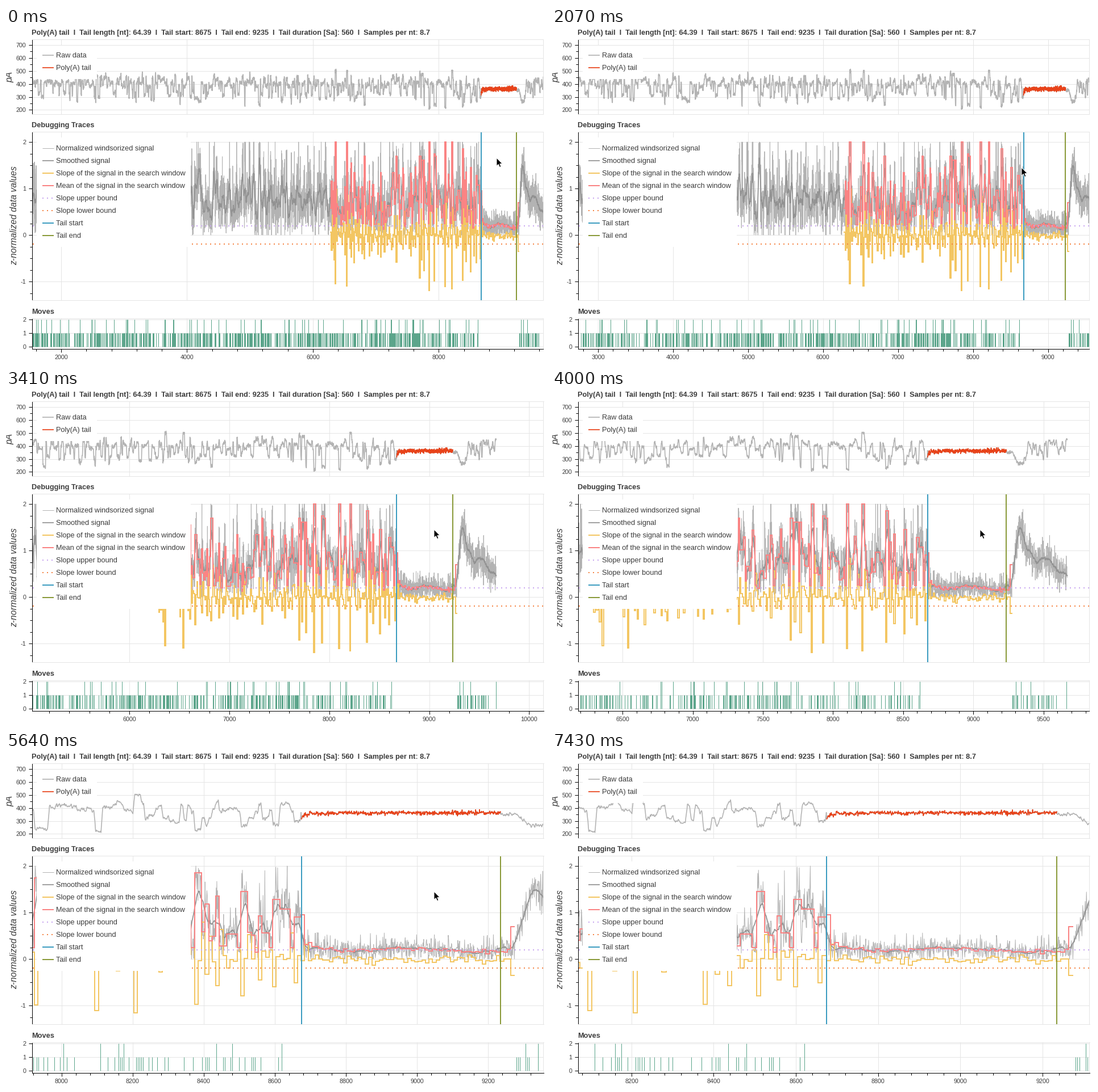
Animation, 950 px wide and 589 px high, one loop 8360 ms. Source, as a matplotlib script:

```python
import numpy as np
import matplotlib.pyplot as plt
from matplotlib.animation import FuncAnimation
from matplotlib.patches import Polygon, Rectangle
from matplotlib.ticker import FormatStrFormatter, MultipleLocator

W, H, DPI = 950, 589, 100
LEFT, RIGHT = 45.5, 945.5
FRAMES, INTERVAL = 110, 76
PX = 72 / DPI  # points per pixel

GRAY, DARK, YELLOW, PINK = "#b3b3b3", "#929292", "#f3c663", "#fa8484"
PURPLE, ORANGE, BLUE, OLIVE = "#c9a6f0", "#f58444", "#3c9cc0", "#8a9a3a"
RED, GREEN, INK, GRID = "#e8431a", "#5ca58b", "#3c3c3c", "#e5e5e5"

TAIL_START, TAIL_END = 8675, 9235
FIRST, STEP, SEARCH, SEARCH_END = 1484, 10, 6284, 9274

# ---------------------------------------------------------------- data
rng = np.random.default_rng(12)

# strongest levels: window start -> signed height
PEAKS = {6354: 2, 6534: 2, 7694: 1.7, 7844: -2, 7924: -1.75, 8094: -2,
         8204: 2, 8374: -1.85, 8504: -1.45, 8594: -1.28, 8654: -.9}


def win(x):
    return (x - FIRST) // STEP


def box(a, n):
    padded = np.pad(a, n // 2, mode="edge")
    return np.convolve(padded, np.ones(n) / n, "valid")


def sigmoid(x):
    return 1 / (1 + np.exp(-x))


def tail_level(x):
    d = np.maximum(x - TAIL_START, 0)
    return .19 + .18 * np.exp(-d / 65) + .035 * np.sin(d / 62 + 3.2)


def window_levels():
    """Signed mean level and slope of every window."""
    starts = np.arange(FIRST, SEARCH_END, STEP)
    n = len(starts)
    run = np.cumsum(rng.random(n) < .72)
    size = np.clip(rng.gamma(3.6, .2, n)[run], .12, 1.7)
    level = size * np.where(rng.random(n) < .68, 1, -1)[run]
    for x, height in PEAKS.items():
        k = win(x)
        level[k - 1] = .25
        level[k:k + 2] = height
    tail = starts > TAIL_START
    level[tail] = tail_level(starts[tail] + 5)
    level[tail] += rng.normal(0, .025, tail.sum())
    mean = np.abs(level)
    slope = .62 * (np.roll(mean, 1) - mean) + rng.normal(0, .045, n)
    mean[-1], slope[-1] = .7, -.35
    return starts, level, mean, slope


def signals(level):
    x = np.arange(1500, 9671)
    n = len(x)
    tail = (x >= TAIL_START) & (x <= TAIL_END)
    after = x > TAIL_END
    noise = rng.normal(0, 1, n)

    raw = 360 + 70 * box(level[np.minimum(win(x), len(level) - 1)], 5)
    d = x[tail] - TAIL_START
    raw[tail] = 363 - 14 * np.exp(-d / 80) - 35 * np.exp(-d / 3)
    raw[after] = 352 - 84 * sigmoid((x[after] - 9298) / 9)
    late = x > 9360
    raw[late] = box(np.repeat(rng.uniform(300, 470, 40), 9)[:late.sum()], 5)
    raw += np.where(tail, 8.5 * noise, 13 * box(noise, 3))
    raw = np.clip(raw, 200, 547)

    size = np.abs(raw - 360) / 70
    spikes = (rng.random(n) < .03) * rng.exponential(.6, n)
    z = .12 + .93 * size + spikes
    z[tail] = tail_level(x[tail]) + .3 * spikes[tail]
    u = x[after]
    z[after] = (.2 + .62 * sigmoid((u - 9290) / 8) - .3 * sigmoid((u - 9580) / 10)
                + .72 * np.exp(-((u - 9340) / 42) ** 2))
    spread = np.where(tail, .13, .1 + .15 * np.minimum(z, 1))
    z = np.clip(z + spread * rng.normal(0, 1, n), 0, 2)
    return x, raw, z, box(z, 27), tail


def moves():
    def bars(lo, hi, p):
        x = lo + np.cumsum(5 * rng.geometric(p, hi - lo))
        return x[x < hi]

    x = np.concatenate([bars(1500, 2130, .42), bars(2200, 7900, .42),
                        bars(7900, 8630, .34), bars(9270, 9600, .4), [9665]])
    h = np.where(rng.random(len(x)) < .14, 2, 1)
    h[-1] = 2
    return x, h


# ---------------------------------------------------------------- stage
plt.rcParams["font.family"] = "Liberation Sans"
fig = plt.figure(figsize=(W / DPI, H / DPI), dpi=DPI, facecolor="white")


def panel(top, bottom, lo, hi, step, minor, share=None):
    ax = fig.add_axes([LEFT / W, 1 - bottom / H, (RIGHT - LEFT) / W,
                       (bottom - top) / H], sharex=share, facecolor="white")
    ax.set_ylim(lo, hi)
    ax.set_axisbelow(True)
    ax.grid(color=GRID, lw=PX)
    ax.yaxis.set_major_locator(MultipleLocator(step))
    ax.yaxis.set_minor_locator(MultipleLocator(minor))
    ax.yaxis.set_major_formatter(FormatStrFormatter("%d"))
    for side, spine in ax.spines.items():
        spine.set(color="black" if side == "left" else GRID, lw=PX)
    ax.tick_params(which="major", length=6 * PX, width=PX, pad=4.5 * PX,
                   labelsize=10.7 * PX, labelcolor=INK)
    ax.tick_params(which="minor", length=4 * PX, width=PX)
    return ax


raw_ax = panel(20, 152, 167.2, 743.7, 100, 50)
dbg_ax = panel(183, 479.5, -1.396, 2.22, 1, .25, raw_ax)
mov_ax = panel(511.5, 566, -.167, 2.104, 1, 1, raw_ax)
for ax in (raw_ax, dbg_ax):
    ax.tick_params(axis="x", which="both", bottom=False, labelbottom=False)
mov_ax.spines["bottom"].set_color("black")
mov_ax.xaxis.set_major_formatter(FormatStrFormatter("%d"))

starts, level, mean, slope = window_levels()
xs, raw, z, smooth, tail = signals(level)


def steps(ax, values, color):
    k = win(SEARCH)
    edges = np.append(starts[k:], SEARCH_END)
    ax.plot(np.repeat(edges, 2)[1:-1], np.repeat(values[k:], 2),
            color=color, lw=2 * PX, solid_joinstyle="miter")


DOTS = (0, (1, 3))
raw_ax.plot(xs, raw, color=GRAY, lw=1.6 * PX)
raw_ax.plot(xs[tail], raw[tail], color=RED, lw=1.6 * PX)
dbg_ax.plot(xs, z, color=GRAY, lw=PX)
dbg_ax.plot(xs, smooth, color=DARK, lw=1.7 * PX)
steps(dbg_ax, slope, YELLOW)
steps(dbg_ax, mean, PINK)
for y, color in ((.2, PURPLE), (-.2, ORANGE)):
    dbg_ax.plot([0, 10315], [y, y], color=color, lw=2 * PX, ls=DOTS,
                dash_capstyle="butt")
dbg_ax.axvline(TAIL_START, color=BLUE, lw=2 * PX)
dbg_ax.axvline(TAIL_END, color=OLIVE, lw=2 * PX)
mx, mh = moves()
mov_ax.vlines(mx, 0, mh, color=GREEN, lw=PX)

# overlay in pixel coordinates
ui = fig.add_axes([0, 0, 1, 1], zorder=5)
ui.set(xlim=(0, W), ylim=(H, 0))
ui.axis("off")


def label(x, y, text, size=12.75, **kw):
    ui.text(x, y, text, fontsize=size * PX, color=INK, **kw)


def legend(x0, y0, x1, y1, first, entries):
    ui.add_patch(Rectangle((x0, y0), x1 - x0, y1 - y0, fc="white", lw=0))
    for i, (text, color, width, style) in enumerate(entries):
        y = first + 22 * i
        ui.plot([64, 83.5], [y, y], color=color, lw=width * PX, ls=style,
                solid_capstyle="butt", dash_capstyle="butt")
        label(88.5, y + 4, text)


legend(54, 31, 160, 90, 48, [
    ("Raw data", GRAY, 1.7, "-"),
    ("Poly(A) tail", RED, 1.7, "-"),
])
legend(54, 193, 325, 385.5, 212, [
    ("Normalized windsorized signal", GRAY, 1, "-"),
    ("Smoothed signal", DARK, 1.7, "-"),
    ("Slope of the signal in the search window", YELLOW, 2, "-"),
    ("Mean of the signal in the search window", PINK, 2, "-"),
    ("Slope upper bound", PURPLE, 2, DOTS),
    ("Slope lower bound", ORANGE, 2, DOTS),
    ("Tail start", BLUE, 2, "-"),
    ("Tail end", OLIVE, 2, "-"),
])

HEAD = ["Poly(A) tail", "Tail length [nt]: 64.39", "Tail start: 8675",
        "Tail end: 9235", "Tail duration [Sa]: 560", "Samples per nt: 8.7"]
label(45, 12, "  I  ".join(HEAD), weight="bold")
label(45, 175.5, "Debugging Traces", weight="bold")
label(45, 503.5, "Moves", weight="bold")
upright = dict(style="italic", rotation=90, ha="center", va="center")
label(7, 86, "pA", 15.6, **upright)
label(14.5, 331, "z-normalized data values", 15.6, **upright)

ARROW = np.array([(0, 0), (0, 14.5), (3.3, 11.5), (5.6, 16.6), (8, 15.5),
                  (5.8, 10.6), (10.2, 10.3)])
cursor = Polygon(ARROW, fc="black", ec="white", lw=PX, zorder=9)
ui.add_patch(cursor)

# ---------------------------------------------------------------- motion
# the view only moves in bursts: first and last change, number of changes
BURSTS = [(900, 1780, 7), (2070, 2670, 5), (3110, 3700, 5), (4000, 4600, 5),
          (4900, 5940, 8), (6090, 6390, 2)]
CHANGES = np.concatenate([[0]] + [np.linspace(*b) for b in BURSTS])
PAN_START, PAN_END, CURSOR_OFF = 2070, 2670, 7430
ZOOM_T = [780, 1780, 2900, 4000, 4600, 5640, 6390]
ZOOM = [.1107, .1319, .1319, .2468, .373, .625, .723]  # pixels per sample
INTERVALS = [m * e for e in (10, 100, 1000) for m in (1, 2, 5)]


def view(t):
    """Left edge and scale; zooming keeps the sample under `px` in place."""
    scale = np.exp(np.interp(t, ZOOM_T, np.log(ZOOM)))
    if t < PAN_START:
        focus, px = 8946, 866
    else:
        focus, px = np.interp(t, [PAN_START, PAN_END], [8094, 9048]), 753
    return focus - (px - LEFT) / scale, scale


def pointer(t):
    times = [780, 1780, PAN_START, PAN_END]
    return (np.interp(t, times, [863, 867, 826, 753]),
            np.interp(t, times, [229, 243, 246, 246]))


def draw(i):
    t = i * INTERVAL + 66
    shown = CHANGES[CHANGES <= t].max()
    left, scale = view(shown)
    span = (RIGHT - LEFT) / scale
    raw_ax.set_xlim(left, left + span)
    step = min(INTERVALS, key=lambda s: abs(6 - span / s))
    mov_ax.xaxis.set_major_locator(MultipleLocator(step))
    mov_ax.xaxis.set_minor_locator(MultipleLocator(step / 5))
    cursor.set_xy(ARROW + pointer(shown))
    cursor.set_visible(t < CURSOR_OFF)
    return []


anim = FuncAnimation(fig, draw, frames=FRAMES, interval=INTERVAL,
                     init_func=lambda: draw(0), repeat=True, blit=False)
plt.show()
```
